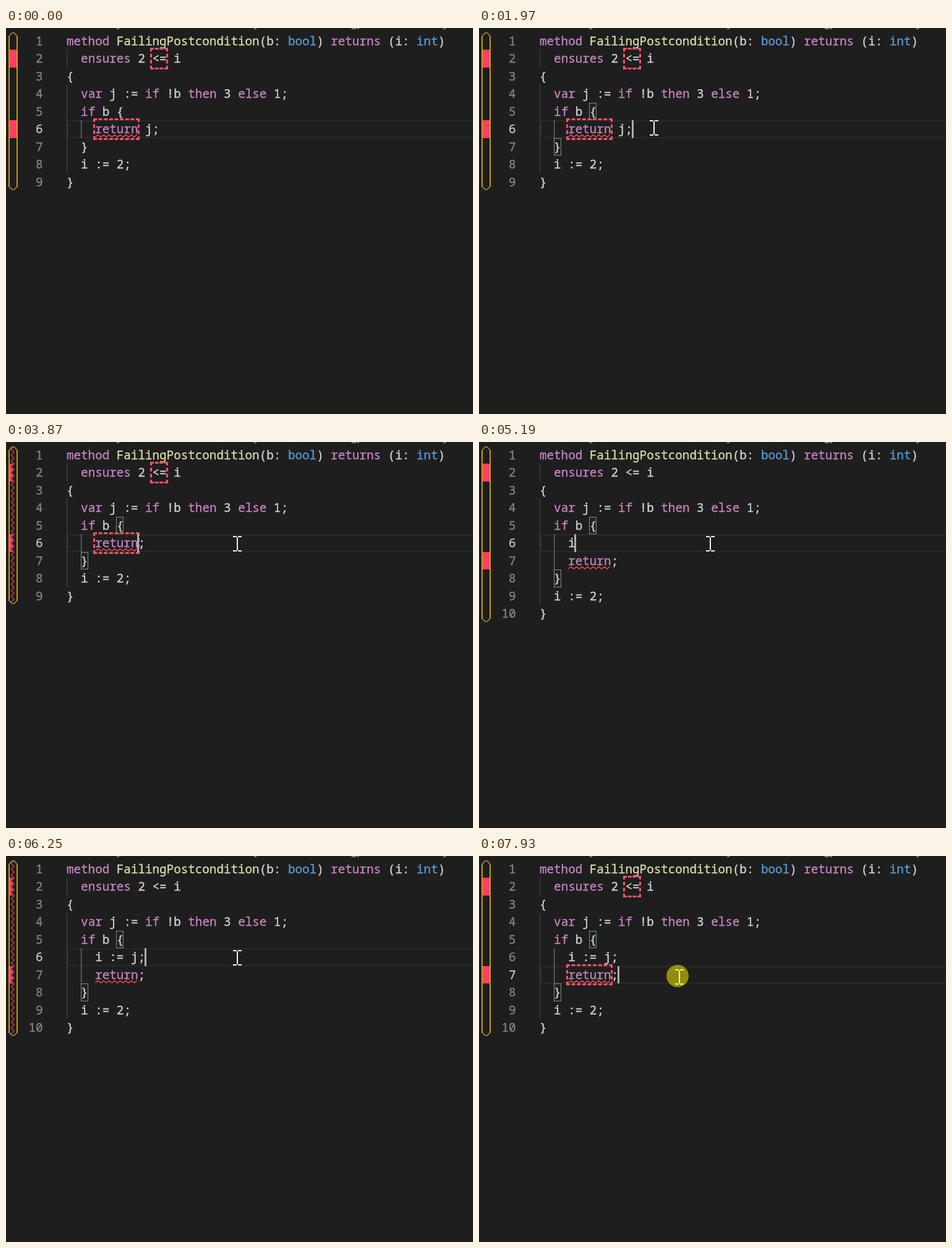
Recreate the animation shown at these times as an HTML page with a canvas. Size 755x624 px, loop 7990 ms.

```html
<!DOCTYPE html>
<html lang="en">
<head>
<meta charset="utf-8">
<title>Failing postcondition</title>
<style>
  html, body { margin: 0; width: 100%; height: 100%; overflow: hidden; background: #1e1e1e; }
  canvas { display: block; }
</style>
</head>
<body>
<canvas id="stage" width="755" height="624"></canvas>
<script>
const ctx = document.getElementById('stage').getContext('2d');
const LOOP = 7990, W = 755, H = 624;
const LEFT = 98, CW = 11.547, TOP = 7, ROW = 28.5;
const MONO = '19.24px "Noto Sans Mono", "DejaVu Sans Mono", monospace';
const RED = '#ff4060';

const colX = c => LEFT + c * CW;
const rowY = r => Math.floor(TOP + (r - 1) * ROW);

// Each entry changes part of the editor state from its time on.
const start = {
  mid: ['    return j;'], row: 6, col: 13, caret: false, pair: false,
  dashed: true, busy: false, phase: 0, wide: false, same: false,
  popup: false, press: false
};
const events = [
  [1840, { press: true }],
  [1910, { caret: true, pair: true }],
  [1970, { press: false }],
  [2380, { caret: false }],
  [2840, { caret: true }],
  [3240, { col: 12 }],
  [3510, { same: true }],
  [3580, { same: false, mid: ['    return ;'], col: 11 }],
  [3730, { mid: ['    return;'], col: 10 }],
  [3800, { busy: true, phase: 0 }],
  [3870, { phase: 1 }],
  [4000, { phase: 0 }],
  [4130, { busy: false, dashed: false, caret: false }],
  [4600, { caret: true, col: 4 }],
  [4670, { mid: ['', '    return;'], busy: true, phase: 1 }],
  [4730, { phase: 0 }],
  [4860, { busy: false }],
  [5190, { mid: ['    i', '    return;'], col: 5 }],
  [5260, { popup: true }],
  [5460, { popup: false, mid: ['    i ', '    return;'], col: 6, wide: true }],
  [5660, { mid: ['    i :', '    return;'], col: 7 }],
  [5730, { mid: ['    i :=', '    return;'], col: 8 }],
  [5860, { mid: ['    i := ', '    return;'], col: 9 }],
  [5920, { mid: ['    i := j', '    return;'], col: 10, wide: false }],
  [6120, { mid: ['    i := j;', '    return;'], col: 11 }],
  [6180, { busy: true, phase: 0 }],
  [6250, { phase: 1 }],
  [6320, { phase: 0 }],
  [6390, { busy: false }],
  [6650, { caret: false }],
  [7110, { caret: true }],
  [7600, { caret: false }],
  [7800, { press: true }],
  [7860, { row: 7, col: 11, caret: true }],
  [7930, { dashed: true }]
];

// Pointer stops: time, x, y
const pointer = [
  [320, 679, 614], [390, 560, 505], [460, 445, 405], [530, 358, 332], [600, 328, 308],
  [860, 326, 300], [930, 312, 260], [1000, 290, 205], [1070, 268, 165], [1140, 257, 147], [1210, 260, 144],
  [1430, 264, 148], [1500, 272, 155], [1570, 279, 160], [1640, 281, 161],
  [1970, 283, 161], [2040, 335, 163], [2110, 374, 164],
  [7110, 367, 169], [7180, 351, 177],
  [7530, 345, 181], [7600, 337, 187], [7660, 330, 191], [7730, 326, 194], [7800, 324, 195]
];

function stateAt(t) {
  const s = { ...start };
  for (const [at, patch] of events) if (t >= at) Object.assign(s, patch);
  return s;
}

function codeLines(s) {
  return [
    'method FailingPostcondition(b: bool) returns (i: int)',
    '  ensures 2 <= i',
    '{',
    '  var j := if !b then 3 else 1;',
    '  if b {',
    ...s.mid,
    '  }',
    '  i := 2;',
    '}'
  ];
}

function fill(color, x, y, w, h) {
  ctx.fillStyle = color;
  ctx.fillRect(x, y, w, h);
}

function polyline(points, color, width) {
  ctx.beginPath();
  points.forEach(([x, y]) => ctx.lineTo(x, y));
  ctx.strokeStyle = color;
  ctx.lineWidth = width;
  ctx.stroke();
}

// A hairline outline gives the letters a slightly heavier weight.
function text(str, x, y, color) {
  ctx.fillStyle = ctx.strokeStyle = color;
  ctx.lineWidth = 0.35;
  ctx.fillText(str, x, y);
  ctx.strokeText(str, x, y);
}

function tokenColor(word) {
  if (/^(method|ensures|returns?|var|if|then|else)$/.test(word)) return '#c586c0';
  if (/^(bool|int)$/.test(word)) return '#569cd6';
  if (word === 'FailingPostcondition') return '#dcdcaa';
  return '#d4d4d4';
}

function drawCode(lines, active) {
  ctx.font = MONO;
  lines.forEach((line, i) => {
    const y = rowY(i + 1) + 21, n = String(i + 1);
    text(n, 59.5 - n.length * CW, y, i + 1 === active ? '#c6c6c6' : '#858585');
    for (const m of line.matchAll(/\w+|[^\w\s]+/g)) text(m[0], colX(m.index), y, tokenColor(m[0]));
  });
}

// Descenders of the line scrolled off the top
function drawCutLine() {
  ctx.font = '17px "Open Sans", "Noto Sans", sans-serif';
  [['y', 179], ['y', 401], ['gp', 558], ['y', 707]].forEach(([c, x]) => text(c, x, -2, '#999999'));
}

function drawGuides(s) {
  const guide = (x, from, to, color) => fill(color, x, rowY(from), 1.3, rowY(to) - rowY(from));
  const close = 6 + s.mid.length;
  guide(98, 2, 3, '#404040');
  guide(98, 4, close + 2, '#404040');
  guide(121, 6, close, '#707070');
}

function drawGutter(s, count) {
  const bottom = rowY(count + 1) - 1;
  const wave = (from, to) => {
    const pts = [], step = ROW / 6;
    for (let i = 0, y = from; y <= to + 0.1; i++, y += step) pts.push([(i + s.phase) % 2 ? 13 : 8.5, y]);
    return pts;
  };
  for (const r of [2, 5 + s.mid.length]) {
    const y = rowY(r), end = rowY(r + 1);
    if (!s.busy) { fill(RED, 5, y, 13, end - y); continue; }
    ctx.beginPath();
    ctx.moveTo(5, y);
    wave(y, y + ROW).forEach(([x, py]) => ctx.lineTo(x - 1, py));
    ctx.lineTo(5, end);
    ctx.fillStyle = RED;
    ctx.fill();
  }
  if (s.busy) polyline(wave(TOP, bottom - 1), '#b5344c', 1.8);

  for (const x of [5, 18]) polyline([[x, 13], [x, bottom - 5]], '#d9a813', 1.8);
  polyline([[5, 13.5], [9.5, 8], [13.5, 8], [18, 13.5]], '#a98a35', 1.6);
  polyline([[5, bottom - 5.5], [10, bottom - 0.8], [13, bottom - 0.8], [18, bottom - 5.5]], '#a98a35', 1.6);
}

function drawSquiggle(from, to, row) {
  const pts = [], y = rowY(row) + 27, end = colX(to) + 1;
  for (let i = 0, x = colX(from); x <= end; i++, x += 4.5) pts.push([x, i % 2 ? y - 3.4 : y]);
  polyline(pts, '#f14c4c', 1.4);
}

function drawDashed(from, to, row) {
  const x0 = Math.floor(colX(from) - 3), x1 = Math.floor(colX(to) + 3);
  const y0 = rowY(row) - 3, y1 = rowY(row + 1) + 3;
  const side = (length, put) => {
    const n = Math.round((length + 3) / 9), pitch = (length - 6) / (n - 1);
    for (let i = 0; i < n; i++) put(i * pitch);
  };
  side(x1 - x0, d => { fill('#ff5068', x0 + d, y0, 6, 3); fill('#ff5068', x0 + d, y1 - 3, 6, 3); });
  side(y1 - y0, d => { fill('#ff5068', x0, y0 + d, 3, 6); fill('#ff5068', x1 - 3, y0 + d, 3, 6); });
}

function drawBracket(col, row) {
  const x = Math.floor(colX(col)), y = rowY(row), h = rowY(row + 1) - y;
  fill('rgba(0,100,0,0.1)', x, y, 12, h);
  ctx.strokeStyle = '#888888';
  ctx.lineWidth = 1;
  ctx.strokeRect(x + 0.5, y + 0.5, 11, h - 1);
}

function drawPopup() {
  const x = 154, y = 178, row = 29;
  const words = ['i', 'if', 'in', 'int', 'is', 'imap', 'iset', 'import', 'include', 'invariant', 'iterator', 'ensures'];
  fill('#454545', x, y, W - x, 348);
  fill('#252526', x + 1, y + 1, W - x, 346);
  fill('#04395e', x + 1, y + 1, W - x, row - 1);
  ctx.font = MONO;
  words.forEach((word, i) => {
    ctx.strokeStyle = '#c5c5c5';
    ctx.lineWidth = 1.5;
    ctx.strokeRect(x + 9, y + i * row + 9, 14, 11);
    text(word, x + 34, y + i * row + 21, '#d4d4d4');
  });
}

function drawPointer(t, press) {
  const stop = pointer.filter(p => t >= p[0]).pop();
  if (!stop) return;
  const [, x, y] = stop;
  fill('#f0f0f0', x - 1, y - 10, 2, 21);
  for (const dy of [-12, 11]) {
    fill('#f0f0f0', x - 7, y + dy, 6, 2);
    fill('#f0f0f0', x + 1, y + dy, 6, 2);
  }
  if (press) {
    ctx.fillStyle = 'rgba(255,250,0,0.5)';
    ctx.beginPath();
    ctx.arc(x - 3, y - 1, 18, 0, Math.PI * 2);
    ctx.fill();
  }
}

function draw(t) {
  const s = stateAt(t), lines = codeLines(s), last = 5 + s.mid.length;
  const top = rowY(s.row), height = rowY(s.row + 1) - top;
  fill('#1e1e1e', 0, 0, W, H);
  fill('#1a1a1a', 0, H - 2, W, 2);
  drawCutLine();

  ctx.strokeStyle = '#292929';
  ctx.lineWidth = 2;
  ctx.strokeRect(100, top + 1, W, height - 2);

  if (s.same) {
    fill('#4b4b4d', colX(6), rowY(4), CW, ROW);
    fill('#4b4b4d', colX(11), rowY(6), CW, ROW);
  }
  drawGuides(s);
  drawGutter(s, lines.length);
  if (s.pair) {
    drawBracket(7, 5);
    drawBracket(2, last + 1);
  }
  drawCode(lines, s.row);
  drawSquiggle(4, s.wide ? 11 : 10, last);
  if (s.dashed) {
    drawDashed(12, 14, 2);
    drawDashed(4, 10, last);
  }
  if (s.caret) fill('#aeafad', Math.floor(colX(s.col)) - 1, top, 3, height);
  if (s.popup) drawPopup();
  drawPointer(t, s.press);
}

const begin = performance.now();
function tick() {
  draw((performance.now() - begin) % LOOP);
  requestAnimationFrame(tick);
}
tick();
</script>
</body>
</html>
```
